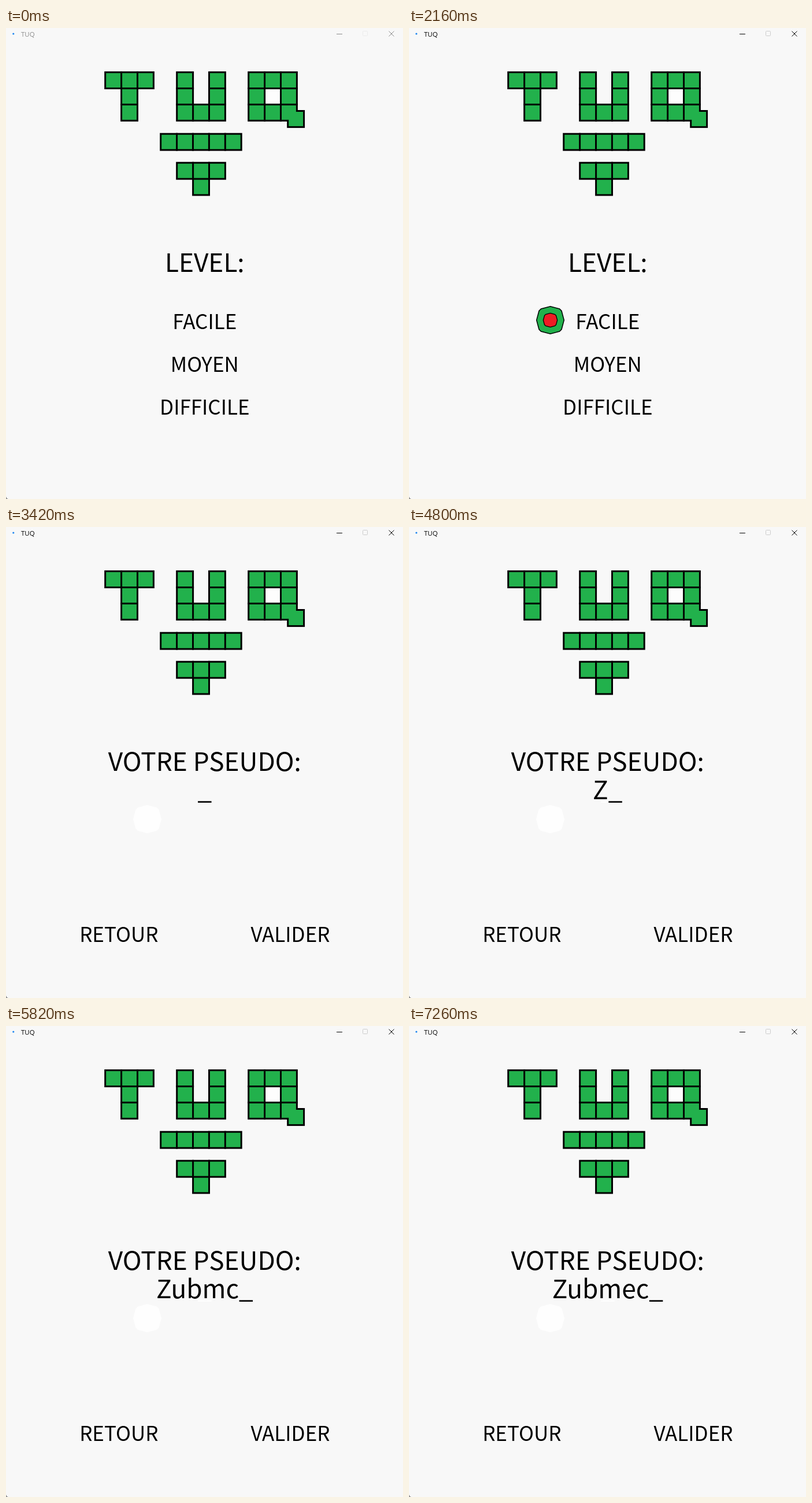
Recreate the animation shown at these times as an HTML page. Size 687x815 px, loop 8 s.

```html
<!DOCTYPE html>
<html lang="fr">
<head>
<meta charset="utf-8">
<title>TUQ</title>
<style>
  html, body { margin: 0; width: 100%; height: 100%; overflow: hidden; background: #f8f8f8; }
  svg { display: block; width: 687px; height: 815px; }
  text { font-family: "Noto Sans CJK JP", "Noto Sans CJK SC", "Noto Sans CJK", sans-serif; font-size: 35px; text-anchor: middle; font-kerning: normal; }
  .big { font-size: 44.2px; }
  .caption { font: 11.5px "Open Sans", sans-serif; text-anchor: start; }
  .ghost { fill: #fefefe; }
</style>
</head>
<body>
<svg viewBox="0 0 687 815">
  <defs>
    <g id="button">
      <path d="M0-23.8 16-19.5 19.5-16 23.8 0 19.5 16 16 19.5 0 23.8-16 19.5-19.5 16-23.8 0-19.5-16-16-19.5Z" fill="#22b14c" stroke="#000" stroke-width="1.5"/>
      <path d="M0-12.2 8-10 10-8 12.2 0 10 8 8 10 0 12.2-8 10-10 8-12.2 0-10-8-8-10Z" fill="#ed1c24" stroke="#000" stroke-width="1.3"/>
    </g>
    <path id="erased" d="M0-24.5 16.5-20 20-16.5 24.5 0 20 16.5 16.5 20 0 24.5-16.5 20-20 16.5-24.5 0-20-16.5-16.5-20Z" class="ghost"/>
  </defs>
  <rect width="687" height="815" fill="#f8f8f8"/>
  <circle cx="12.8" cy="10" r="1.6" fill="#1a84f0"/>
  <g id="titlebar">
    <text class="caption" x="26" y="14.5" fill="currentColor">TUQ</text>
    <path d="M572 10.5H582M662.5 5.5 671.5 14.5M671.5 5.5 662.5 14.5" stroke="currentColor" fill="none"/>
    <rect id="maximize" x="617.5" y="5.5" width="8" height="8" rx="1" fill="none"/>
  </g>
  <rect x="449" y="106" width="26" height="26" fill="#fdfdfd"/>
  <g id="logo"></g>
  <g id="screen"></g>
  <path d="M0 811Q1 814 4 815H0Z" fill="#888"/>
</svg>
<script>
const LOOP = 8000, CENTER = 343.8;
const PITCH = 27.9, BORDER = 3;
const get = id => document.getElementById(id);

// Block shapes: left, top, rows of cells.
const shapes = [
  [170.2, 75.1, ["###", " # ", " # "]],
  [294.2, 75.1, ["# #", "# #", "###"]],
  [418.2, 75.1, ["###", "# #", "###"]],
  [486.2, 142, ["#"]],
  [266.2, 181.7, ["#####"]],
  [294.2, 231.7, ["###", " # "]]
];
const cells = shapes.flatMap(([left, top, rows]) =>
  rows.flatMap((row, r) => [...row].flatMap((cell, c) =>
    cell === "#" ? [[left + PITCH * c, top + PITCH * r]] : [])));
const squares = (inset, color) => {
  const size = PITCH + BORDER - 2 * inset;
  return cells.map(([x, y]) =>
    `<rect x="${x + inset}" y="${y + inset}" width="${size}" height="${size}" fill="${color}"/>`).join("");
};
get("logo").innerHTML = squares(0, "#000") + squares(BORDER, "#22b14c");

const label = (text, x, y, style = "") => `<text x="${x}" y="${y}" class="${style}">${text}</text>`;
const place = (id, x, y) => `<use href="#${id}" x="${x}" y="${y}"/>`;

const typing = [
  [3420, ""], [4800, "Z"], [5040, "Zu"], [5220, "Zub"], [5400, "Zubm"],
  [5820, "Zubmc"], [6600, "Zubm"], [7020, "Zubme"], [7260, "Zubmec"]
];

function levelScreen(t) {
  let out = label("LEVEL:", CENTER, 422, "big") + label("FACILE", CENTER, 521)
    + label("MOYEN", CENTER, 595) + label("DIFFICILE", CENTER, 669);
  if (t >= 2160) out += place(t < 2460 ? "button" : "erased", 244.5, 505.5);
  if (t >= 2580) out += place("button", 239.5, 579.5);
  return out;
}

function nameScreen(t) {
  const [, name] = typing.findLast(([start]) => t >= start);
  return place("erased", 244.5, 505.5)
    + label("_", CENTER, 471, "big ghost")
    + label(name + "_", CENTER, 471, "big")
    + label("VOTRE PSEUDO:", CENTER, 422, "big")
    + label("RETOUR", 195.3, 718) + label("VALIDER", 492, 718);
}

let shown = "";
function draw(now) {
  const t = now % LOOP, active = t >= 1140;
  get("titlebar").style.color = active ? "#000" : "#8c8c8c";
  get("maximize").setAttribute("stroke", active ? "#ccc" : "#ececec");
  const screen = t < 3420 ? levelScreen(t) : nameScreen(t);
  if (screen !== shown) get("screen").innerHTML = shown = screen;
}

const start = performance.now();
function tick() {
  draw(performance.now() - start);
  requestAnimationFrame(tick);
}
tick();
</script>
</body>
</html>
```
